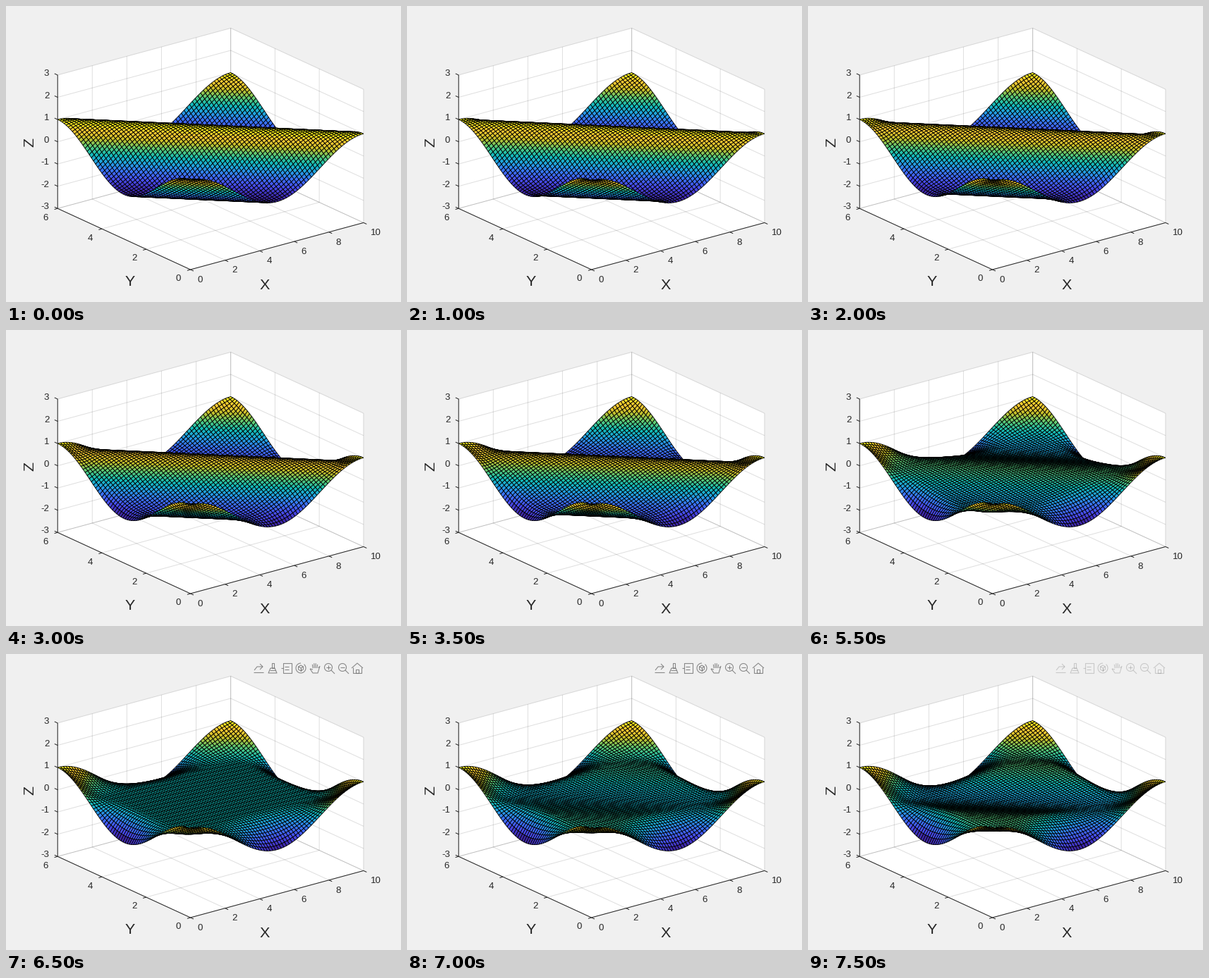
Write a matplotlib script that moves like this. It is 560x420 px and loops after 8 s.

```python
import numpy as np
import matplotlib.pyplot as plt
from matplotlib.animation import FuncAnimation
from matplotlib.collections import LineCollection, PolyCollection
from matplotlib.colors import LinearSegmentedColormap

W, H, DPI = 560, 420, 100
PX = 72 / DPI                      # points per pixel
FRAMES, INTERVAL = 16, 500
LX, LY, ZMIN, ZMAX = 10, 6, -3, 3
INK, BACK = "#262626", "#f0f0f0"

plt.rcParams["font.family"] = "Liberation Sans"
fig = plt.figure(figsize=(W / DPI, H / DPI), dpi=DPI, facecolor=BACK)
ax = fig.add_axes([0, 0, 1, 1])
ax.set_xlim(0, W)
ax.set_ylim(H, 0)
ax.axis("off")

# Orthographic view, azimuth -37.5, elevation 30, stretched to the axes box
AZ, EL = np.radians(37.5), np.radians(30)
SX, SY = 309.3, 218.6
ORIGIN = (261.5, 374.0)


def project(x, y, z):
    u, v, w = x / LX, y / LY, (z - ZMIN) / (ZMAX - ZMIN)
    px = ORIGIN[0] + SX * (u * np.cos(AZ) - v * np.sin(AZ))
    depth = u * np.sin(AZ) + v * np.cos(AZ)
    py = ORIGIN[1] - SY * (depth * np.sin(EL) + w * np.cos(EL))
    return np.stack([px, py], axis=-1)


def line3(*points):
    return np.array([project(*p) for p in points])


def add_lines(segments, color, width, z, **kw):
    lines = LineCollection(segments, colors=color, linewidths=width * PX,
                           zorder=z, **kw)
    ax.add_collection(lines)
    return lines


# Walls, floor and grid
walls = [
    line3((0, LY, ZMIN), (LX, LY, ZMIN), (LX, LY, ZMAX), (0, LY, ZMAX)),
    line3((LX, 0, ZMIN), (LX, LY, ZMIN), (LX, LY, ZMAX), (LX, 0, ZMAX)),
    line3((0, 0, ZMIN), (LX, 0, ZMIN), (LX, LY, ZMIN), (0, LY, ZMIN)),
]
ax.add_collection(PolyCollection(walls, facecolors="white",
                                 edgecolors="none", zorder=0))

xticks, yticks, zticks = range(0, 11, 2), range(0, 7, 2), range(-3, 4)
grid = [line3((x, 0, ZMIN), (x, LY, ZMIN), (x, LY, ZMAX)) for x in xticks]
grid += [line3((0, y, ZMIN), (LX, y, ZMIN), (LX, y, ZMAX)) for y in yticks]
grid += [line3((0, LY, z), (LX, LY, z), (LX, 0, z)) for z in zticks]
add_lines(grid, INK, 1, 1, alpha=0.15)

# Axis lines, ticks and labels
add_lines([line3((0, LY, ZMAX), (0, LY, ZMIN), (0, 0, ZMIN), (LX, 0, ZMIN))],
          INK, 1, 4)


def label(x, y, text, size=13.3, ha="center", **kw):
    ax.text(x, y, text, fontsize=size * PX, color=INK, zorder=5,
            ha=ha, va="center", **kw)


def add_tick(point, step, offset, text, ha="center"):
    add_lines([[point, point + step]], INK, 1, 4)
    label(*(point + offset), str(text), ha=ha)


for x in xticks:
    shift = 13.4 + 4 * (x >= 10)   # two digits need more room
    add_tick(project(x, 0, ZMIN), (4.4, 2), (shift, 14.8), x)
for y in yticks:
    add_tick(project(0, y, ZMIN), (-4.6, 1.3), (-17, 13.4), y)
for z in zticks:
    add_tick(project(0, LY, z), (-4.4, -2), (-12, -1.8), z, ha="right")

label(366.5, 396.5, "X", 21.5)
label(175.5, 391.5, "Y", 21.5)
label(34, 193, "Z", 21.5, rotation=90)

cmap = LinearSegmentedColormap.from_list("sea", [
    "#3e26a8", "#484cef", "#3a74fe", "#21a3e3", "#12beb9",
    "#5ccc76", "#c8c129", "#fdca33", "#f9fb15"])

# Wave equation with a fixed rim, released from rest
N = 63
SUB = 4                            # solver steps per picture
STEP = 0.092 / SUB                 # wave speed times time step
X, Y = np.meshgrid(np.linspace(0, LX, N + 1), np.linspace(0, LY, N + 1))
RX, RY = (STEP * N / LX) ** 2, (STEP * N / LY) ** 2


def pull(u):
    a = np.zeros_like(u)
    mid = u[1:-1, 1:-1]
    a[1:-1, 1:-1] = (RX * (u[1:-1, 2:] - 2 * mid + u[1:-1, :-2])
                     + RY * (u[2:, 1:-1] - 2 * mid + u[:-2, 1:-1]))
    return a


def simulate(count):
    old = np.cos(2 * np.pi * (X / LX + Y / LY))
    now = old + pull(old) / 2
    states = [old, now]
    while len(states) < count:
        old, now = now, 2 * now - old + pull(now)
        states.append(now)
    return states


# The first picture is already one step into the motion
states = simulate(SUB * FRAMES + 1)[SUB::SUB]


def quads(z):
    p = project(X, Y, z)
    q = np.stack([p[:-1, :-1], p[:-1, 1:], p[1:, 1:], p[1:, :-1]], axis=2)
    return q[::-1, ::-1].reshape(-1, 4, 2)      # far cells first


def shades(z):
    level = (z - z.min()) / (z.max() - z.min())
    return cmap(level[:-1, :-1][::-1, ::-1].ravel())


surface = PolyCollection(quads(states[0]), edgecolors="black",
                         linewidths=0.85 * PX, joinstyle="bevel", zorder=3)
ax.add_collection(surface)


# Hover toolbar: each icon is drawn around its own centre
def ring(r, x=0, y=0, start=0, end=360, n=24):
    t = np.radians(np.linspace(start, end, n + 1))
    return np.column_stack([x + r * np.cos(t), y + r * np.sin(t)])


def box(x0, y0, x1, y1):
    return [(x0, y0), (x1, y0), (x1, y1), (x0, y1), (x0, y0)]


def dash(y, x0=-3, x1=3):
    return [(x0, y), (x1, y)]


lens = [ring(5.5, -1, -1), [(3, 3), (8, 8)], dash(-1, -4, 2)]
icons = [
    # export
    [dash(6, -7, 7), [(-6, 3), (-2, -2), (6, -2)], [(2, -6), (6, -2), (2, 2)]],
    # brush
    [box(-1.5, -7, 1.5, 0), [(-3, 0), (3, 0), (6, 7), (-6, 7), (-3, 0)],
     dash(3, -4, 4)],
    # data tip
    [box(-5, -7, 7, 7), dash(-2), dash(2), dash(0, -8, -5)],
    # rotate
    [ring(7, start=-50, end=270), ring(4, start=30, end=390, n=6),
     *[[(0, 0), p] for p in ring(4, start=90, end=450, n=3)]],
    # pan
    [[(-7, 1), (-3, 7), (4, 7), (7, -3)], [(-7, 1), (-3, 2)],
     *[[(x, 0), (x * 1.2, x * x / 5 - 7)] for x in (-3, -1, 1, 3, 5)]],
    # zoom in, zoom out
    lens + [[(-1, -4), (-1, 2)]],
    lens,
    # home
    [[(-8, 0), (0, -7), (8, 0)], [(-6, -1), (-6, 7), (6, 7), (6, -1)],
     box(-2, 2, 2, 7)],
]
strokes = [np.array(s) + (358 + 20 * k, 20)
           for k, icon in enumerate(icons) for s in icon]
toolbar = add_lines(strokes, "#707070", 1.1, 6, alpha=0)


def draw(i):
    surface.set_verts(quads(states[i]))
    surface.set_facecolor(shades(states[i]))
    toolbar.set_alpha(np.interp(i, [11, 13, 14, 15], [0, 0.8, 0.8, 0.3]))
    return surface, toolbar


anim = FuncAnimation(fig, draw, frames=FRAMES, interval=INTERVAL,
                     repeat=True, repeat_delay=0, blit=False)
plt.show()
```
